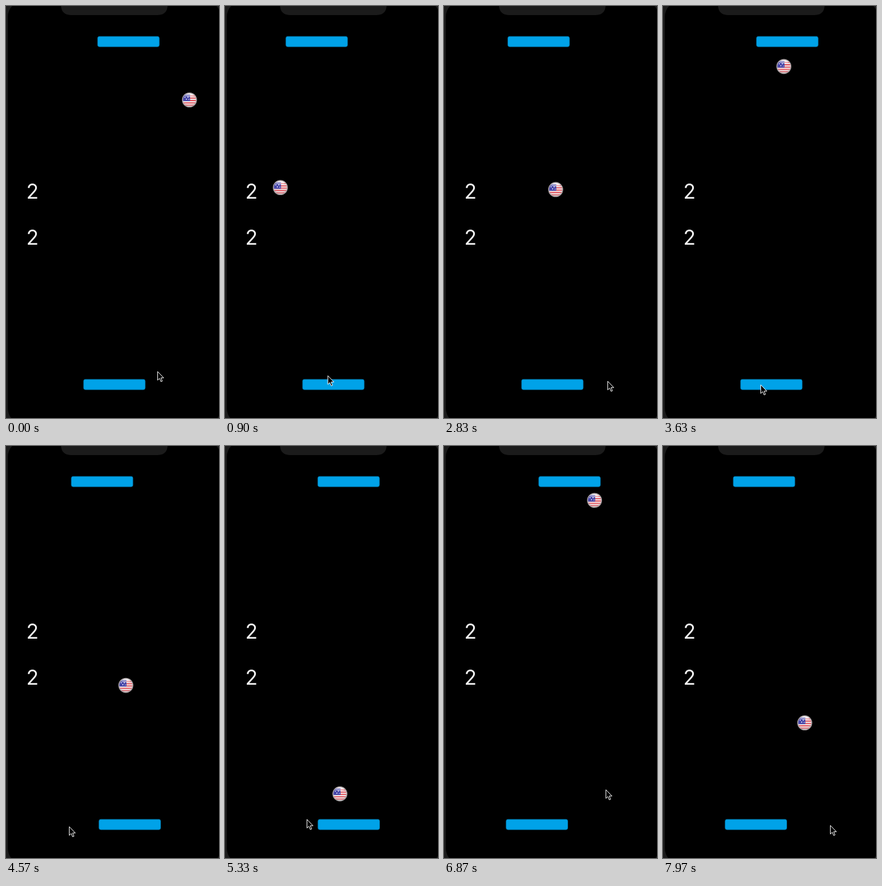
Animation, 352 px wide and 680 px high, one loop 8000 ms. Source, as an HTML page:

```html
<!DOCTYPE html>
<html lang="en">
<head>
<meta charset="utf-8">
<title>Paddle game</title>
<style>
  html, body { margin: 0; width: 100%; height: 100%; overflow: hidden; background: #1b1b1b; }
  svg { display: block; width: 100%; height: 100%; }
  text { font: 400 33.5px Inter, "Liberation Sans", sans-serif; fill: #f2f2f2; text-anchor: middle; }
  .paddle { fill: #00a2e8; stroke: #0078ac; stroke-width: .8; }
</style>
</head>
<body>
<svg viewBox="0 0 352 680">
  <defs>
    <clipPath id="disc"><circle r="11.6"/></clipPath>
    <radialGradient id="shade" cy=".4" r=".62">
      <stop offset=".6" stop-color="#fff" stop-opacity="0"/>
      <stop offset="1" stop-color="#555" stop-opacity=".5"/>
    </radialGradient>
  </defs>
  <rect x="3" y="-8" width="352" height="698" rx="26"/>
  <path d="M91 -1V0Q92 15 108 15H250Q266 15 267 0V-1Z" fill="#1b1b1b"/>
  <text x="43.7" y="317.7">2</text>
  <text x="43.7" y="393.7">2</text>
  <rect id="top" class="paddle" x="-50.8" y="50.2" width="101.8" height="17" rx="3"/>
  <rect id="bottom" class="paddle" x="-50.8" y="616.2" width="101.8" height="17" rx="3"/>
  <g id="ball">
    <g clip-path="url(#disc)">
      <circle r="12" fill="#f0e6e8"/>
      <path d="M-12 -6.6H12M-12 -2.8H12M-12 1H12M-12 4.8H12M-12 8.6H12" stroke="#e2505a" stroke-width="1.8"/>
      <path d="M-12 -9H1V2H-12Z" fill="#4444a8"/>
      <g fill="#fff">
        <circle cx="-7.5" cy="-4.5" r=".9"/><circle cx="-2.5" cy="-4.5" r=".9"/>
        <circle cx="-5" cy="-1.2" r=".9"/><circle cx="-1" cy="-.7" r=".7"/>
      </g>
      <ellipse cy="-8.5" rx="9" ry="3.6" fill="#fff" opacity=".45"/>
      <circle r="12" fill="url(#shade)"/>
    </g>
    <circle r="11.6" fill="none" stroke="#aaa2a4" stroke-width="1.5"/>
  </g>
  <path id="cursor" d="M-.4 .3V14.6L2.8 11.6L5.1 17L7.3 16.1L5.1 10.8H9.6Z" stroke="#fff" stroke-linejoin="round"/>
</svg>
<script>
const LOOP = 8000;
const LEFT = 18, RIGHT = 340, TOP = 80, BOTTOM = 604;

// Paddle hits, bottom and top in turn: time and total sideways travel.
const hits = [[-1347, 457], [225, 1094], [1835, 1732], [3567, 2370], [5235, 3012], [6901, 3645], [8387, 4250]];
// Resting points of the pointer: time, x, y.
const stops = [[0, 251, 603], [1730, 99, 616], [2830, 271, 619], [4150, 105, 628],
  [5050, 105, 628], [6070, 272, 563], [6870, 268, 567], [LOOP, 277, 626]];

const mix = (a, b, f) => a + (b - a) * f;

function ease(t, from, to) {
  const f = Math.min(1, Math.max(0, (t - from) / (to - from)));
  return f * f * (3 - 2 * f);
}

// Index of the span between keys that contains t.
const spanAt = (keys, t) => keys.findIndex(key => key[0] > t) - 1;

// Turns travelled distance into a position bouncing between two walls.
function reflect(distance, min, max) {
  const span = max - min;
  return max - Math.abs(distance % (2 * span) - span);
}

function place(id, x, y = 0) {
  document.getElementById(id).setAttribute("transform", `translate(${x} ${y})`);
}

function draw(t) {
  const leg = spanAt(hits, t);
  const [hitTime, hitRun] = hits[leg], [nextTime, nextRun] = hits[leg + 1];
  const progress = (t - hitTime) / (nextTime - hitTime);
  const run = mix(hitRun, nextRun, progress);
  const rise = (leg + 1 + progress) * (BOTTOM - TOP);
  place("ball", reflect(run, LEFT, RIGHT), reflect(rise, TOP, BOTTOM));

  // The upper paddle trails the ball with a smaller, delayed swing.
  place("top", 179 - 28.5 * Math.cos((run - 100) * Math.PI / (RIGHT - LEFT)));
  place("bottom", 179 + 25.5 * ease(t, 3950, 4250) - 51 * ease(t, 5750, 5950));

  const i = spanAt(stops, t);
  const [fromTime, fromX, fromY] = stops[i], [toTime, toX, toY] = stops[i + 1];
  const glide = ease(t, fromTime, toTime);
  place("cursor", mix(fromX, toX, glide), mix(fromY, toY, glide));
}

let start;
function tick(now) {
  start ??= now;
  draw((now - start) % LOOP);
  requestAnimationFrame(tick);
}
draw(0);
requestAnimationFrame(tick);
</script>
</body>
</html>
```
